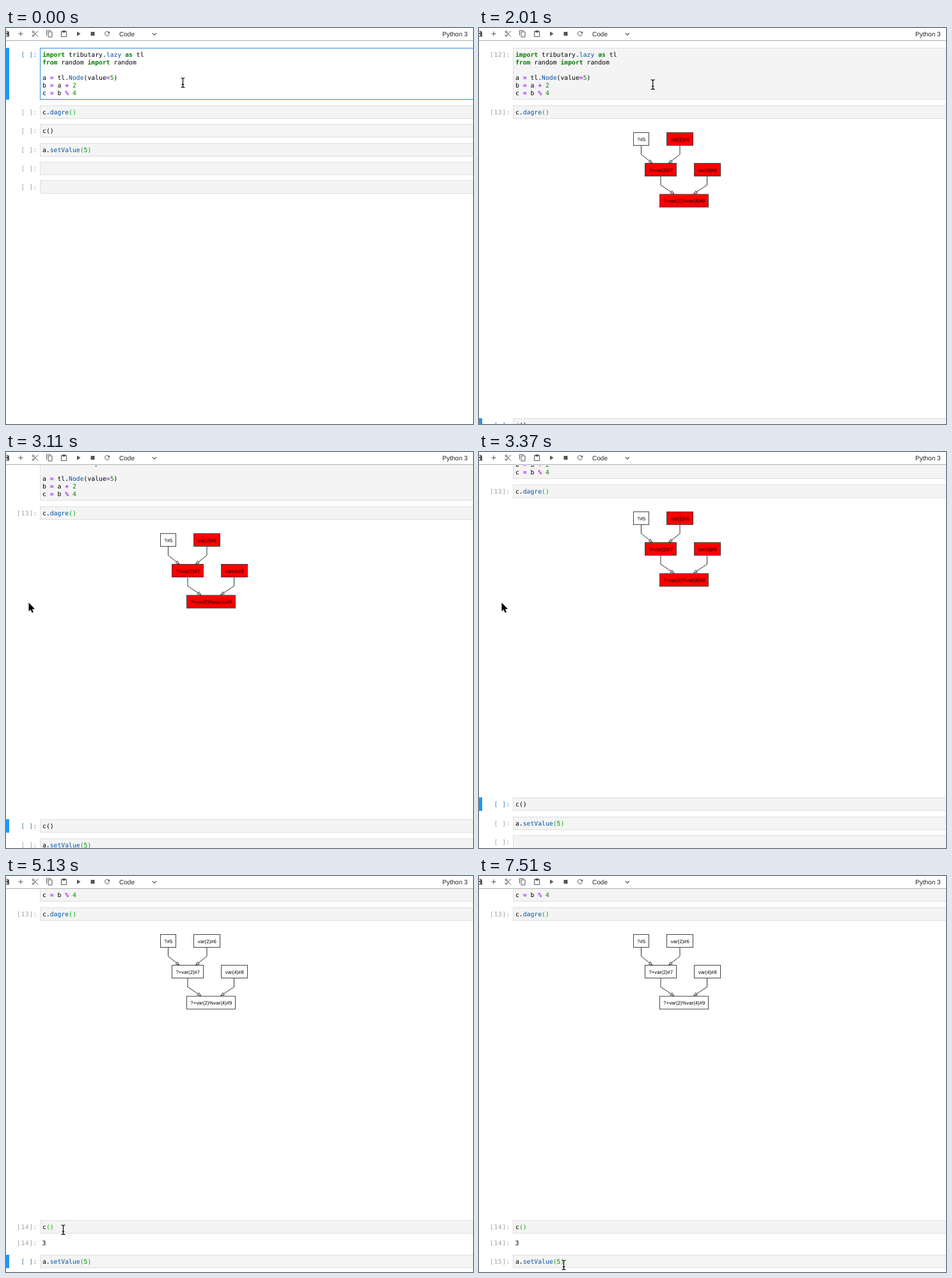
These frames come from a looping animation (730x619 px, 8 s). An HTML page:

```html
<!DOCTYPE html>
<html lang="en">
<head>
<meta charset="utf-8">
<title>Notebook</title>
<style>
  html, body { margin: 0; width: 100%; height: 100%; overflow: hidden; background: #fff; }
  svg { display: block; }
  text { white-space: pre; text-rendering: geometricPrecision; }
  .code, .prompt { font: 9.75px "DejaVu Sans Mono", monospace; }
  .prompt { fill: #616161; fill-opacity: .6; letter-spacing: .5px; text-anchor: end; }
  .active .prompt { fill: #307fc1; fill-opacity: 1; }
  .box { fill: #f4f4f4; stroke: #dfdfdf; }
  .edit .box { fill: #fff; stroke: #2f8ddb; }
  .bar { fill: #2196f3; visibility: hidden; }
  .active .bar { visibility: visible; }
  .k { fill: #008000; font-weight: bold; }
  .o { fill: #aa22ff; font-weight: bold; }
  .n { fill: #008800; }
  .f { fill: #0055aa; }
  .b { fill: #00b000; }
  .ui { font: 10.05px "Liberation Sans", Arial, sans-serif; fill: #222; }
  .node { stroke: #444; }
  .label { font: 7.78px "Liberation Sans", Arial, sans-serif; text-anchor: middle; }
  .edge { fill: none; stroke: #333; }
  .head { fill: #fff; fill-opacity: .5; stroke: #333; stroke-width: .8; }
  .icon { fill: #555; }
  .line { fill: none; stroke: #555; stroke-width: 2; }
</style>
</head>
<body>
<svg width="730" height="619" viewBox="0 0 730 619">
  <g id="page">
    <g id="graph"></g>
    <g id="cells"></g>
    <g id="result">
      <text class="prompt" x="48.9" y="39.3">[14]:</text>
      <text class="code" x="56.5" y="38.6">3</text>
    </g>
    <rect id="caret" width="1" height="12"/>
  </g>
  <rect width="730" height="20" fill="#fff"/>
  <rect y="19" width="730" height="1" fill="#b5b5b5"/>
  <rect y="20" width="730" height="1" fill="#f0f0f0"/>
  <g id="tools"></g>
  <text class="ui" x="177" y="12.5">Code</text>
  <path d="M229 8l3 3.2 3-3.2" fill="none" stroke="#555" stroke-width="1.1"/>
  <text class="ui" x="682" y="13.2">Python 3</text>
  <g id="arrow">
    <path d="M0 0V13.6L3 10.8 5.2 15.8 7.5 14.8 5.3 9.9H9.6Z" stroke="#fff" stroke-width="1.6" paint-order="stroke"/>
  </g>
  <g id="beam" fill="none">
    <path id="stem" d="M-3-7.5Q0-7.5 0-5.8Q0-7.5 3-7.5M0-6V6M-3 7.5Q0 7.5 0 5.8Q0 7.5 3 7.5M-1.8 2.8H1.8" stroke="#fff" stroke-width="2.6" stroke-opacity=".8"/>
    <use href="#stem"/>
  </g>
</svg>
<script>
const LOOP = 8000, LINE = 12, PITCH = 29.25;
const $ = id => document.getElementById(id);

// Value of the latest step at or before t
const at = (t, steps) => steps.reduce((v, [start, next]) => t >= start ? next : v, steps[0][1]);

const SOURCES = [
  ['{k:import} tributary.{f:lazy} {k:as} tl', '{k:from} random {k:import} random', '',
   'a {o:=} tl.{f:Node}(value{o:=}{n:5})', 'b {o:=} a {o:+} {n:2}', 'c {o:=} b {o:%} {n:4}'],
  ['c.{f:dagre}{b:()}'],
  ['c{p:()}'],
  ['a.{f:setValue}{b:(}{n:5}{b:)}'],
  [''],
  ['']
];

const PROMPTS = [
  [[0, ' '], [90, '*'], [150, '12']],
  [[0, ' '], [1290, '*'], [1410, '13']],
  [[0, ' '], [4840, '*'], [5130, '14']],
  [[0, ' '], [7450, '*'], [7510, '15']],
  [[0, ' ']],
  [[0, ' ']]
];

const ACTIVE = [[0, 0], [90, 1], [1290, 2], [4840, 3], [7450, 4]];
const EDIT = [[0, 0], [90, -1], [4310, 2], [4840, -1], [6620, 3], [7450, -1]];
const SCROLL = [[0, 0], [2990, 6], [3050, 20], [3110, 36], [3190, 50],
                [3250, 59], [3310, 66], [3370, 70], [3430, 72]];

const smooth = p => p * p * (3 - 2 * p);
const out = p => 1 - (1 - p) ** 2;
const MOVES = [
  { start: 2010, end: 2630, n: 12, from: [276.5, 85.5], to: [35.5, 235.5], ease: smooth },
  { start: 3490, end: 3770, n: 5, from: [35.5, 235.5], to: [90.5, 501], ease: smooth },
  { start: 3830, end: 4070, n: 5, from: [90.5, 501], to: [89.5, 553], ease: out },
  { start: 5790, end: 6020, n: 5, from: [89.5, 553], to: [114.5, 630], ease: p => p ** 1.4 },
  { start: 6200, end: 6380, n: 4, from: [118, 632], to: [132.5, 608], ease: out }
];

function buildCells() {
  const markup = s => s.replace(/\{(\w):(.*?)\}/g, '<tspan class="$1">$2</tspan>');
  $('cells').innerHTML = SOURCES.map(lines => {
    const h = lines.length * LINE + 9;
    const code = lines.map((s, i) =>
      `<text class="code" x="57" y="${13.7 + i * LINE}">${markup(s)}</text>`).join('');
    return `<g><rect class="bar" width="5" height="${h}"/>
      <rect class="box" x="53.5" y=".5" width="690" height="${h - 1}"/>
      <text class="prompt" x="48.9" y="14.4"></text>${code}</g>`;
  }).join('');
}

function buildGraph() {
  const nodes = [
    [241.5, 163.5, 24, '?#5'], [293.5, 163.5, 41, 'var(2)#6'],
    [259.5, 211.5, 49, '?+var(2)#7'], [336.5, 211.5, 41, 'var(4)#8'],
    [282.5, 260, 76, '?+var(2)%var(4)#9']
  ];
  const edges = [[253.5, 184, 271], [314, 184, 296.5], [284, 232, 305], [356.5, 232, 335.5]];
  const boxes = nodes.map(([x, y, w, label], i) =>
    `<rect class="node${i ? ' dirty' : ''}" x="${x}" y="${y}" width="${w}" height="20" fill="#fff"/>
     <text class="label" x="${x + w / 2 + .3}" y="${y + 13.1}">${label}</text>`);
  const lines = edges.map(([x, y, tip]) => {
    const end = y + 27.3;
    const angle = Math.atan2(end - y - 13.5, tip - x) * 180 / Math.PI;
    return `<path class="edge" d="M${x} ${y}v13.5L${tip} ${end}"/>
      <path class="head" d="M0 0L-5.5-2.3V2.3Z" transform="translate(${tip} ${end}) rotate(${angle})"/>`;
  });
  $('graph').innerHTML = boxes.concat(lines).join('');
}

function buildTools() {
  const fill = d => `<path class="icon" fill-rule="evenodd" d="${d}"/>`;
  const line = d => `<path class="line" d="${d}"/>`;
  const icons = [
    fill('M3 3H17L21 7V21H3ZM5 5V9H15V5ZM12 13a3 3 0 0 0 0 6a3 3 0 0 0 0-6Z'),
    fill('M19 13h-6v6h-2v-6H5v-2h6V5h2v6h6Z'),
    line('M6 3a3 3 0 0 0 0 6a3 3 0 0 0 0-6ZM6 15a3 3 0 0 0 0 6a3 3 0 0 0 0-6ZM8 8L21 21M8 16L21 3'),
    line('M3 17V2H16M8 6H20V22H8Z'),
    line('M4 4H20V21H4Z') + fill('M7 3H10a2 2 0 0 1 4 0H17V8H7Z'),
    fill('M8 5v14l11-7Z'),
    fill('M6 6h12v12H6Z'),
    line('M17.5 7.2A7 7 0 1 0 18.7 14') + fill('M20 4V11H13Z')
  ];
  $('tools').innerHTML = icons.map((icon, i) =>
    `<g transform="translate(${(i * 22.5 - 5.5).toFixed(1)} 3) scale(.5)">${icon}</g>`).join('');
}

function cellTop(i, t) {
  let y = i ? 121.2 + PITCH * (i - 1) : 31;
  if (i > 1 && t >= 1410) y += 459.85;
  if (i > 2 && t >= 5130) y += 24.3;
  return Math.round(y - at(t, SCROLL));
}

function pointer(t) {
  let pos = MOVES[0].from;
  for (const { start, end, n, from, to, ease } of MOVES) {
    if (t < start) break;
    const step = Math.floor((t - start) / (end - start) * (n - 1) + 1e-6) + 1;
    const p = ease(Math.min(1, step / n));
    pos = from.map((v, i) => v + (to[i] - v) * p);
  }
  return pos;
}

const place = (el, x, y) => el.setAttribute('transform', `translate(${x} ${y})`);
const show = (el, on) => { el.style.display = on ? '' : 'none'; };

buildCells();
buildGraph();
buildTools();
const cells = [...$('cells').children];
const prompts = cells.map(c => c.querySelector('.prompt'));
const dirty = document.querySelectorAll('.dirty');
const pair = document.querySelector('.p');

function draw(t) {
  const active = at(t, ACTIVE), edit = at(t, EDIT);
  const tops = cells.map((_, i) => cellTop(i, t));
  cells.forEach((cell, i) => {
    place(cell, 0, tops[i]);
    cell.classList.toggle('active', i === active);
    cell.classList.toggle('edit', i === edit);
    prompts[i].textContent = `[${at(t, PROMPTS[i])}]:`;
  });
  pair.setAttribute('fill', t >= 4370 ? '#00b000' : '#000');

  place($('graph'), 0, -at(t, SCROLL));
  show($('graph'), t >= 1410);
  dirty.forEach(n => n.setAttribute('fill', t < 5080 ? '#f00' : '#fff'));

  place($('result'), 0, tops[2]);
  show($('result'), t >= 5130);

  const inThird = t >= 4370 && t < 4840;
  show($('caret'), inThird || (t >= 6680 && t < 7160));
  place($('caret'), inThird ? 75 : 133, tops[inThird ? 2 : 3] + 4);

  // Text cursor over an editor, arrow elsewhere
  const [x, y] = pointer(t);
  const overText = x > 53 && tops.some((top, i) =>
    y >= top && y <= top + SOURCES[i].length * LINE + 9);
  show($('beam'), overText);
  show($('arrow'), !overText);
  place($(overText ? 'beam' : 'arrow'), x, y);
}

$('beam').querySelector('use').outerHTML =
  `<path d="${$('stem').getAttribute('d')}" stroke="#000" stroke-width="1.2"/>`;

const begin = performance.now();
function tick() {
  draw((performance.now() - begin) % LOOP);
  requestAnimationFrame(tick);
}
tick();
</script>
</body>
</html>
```
